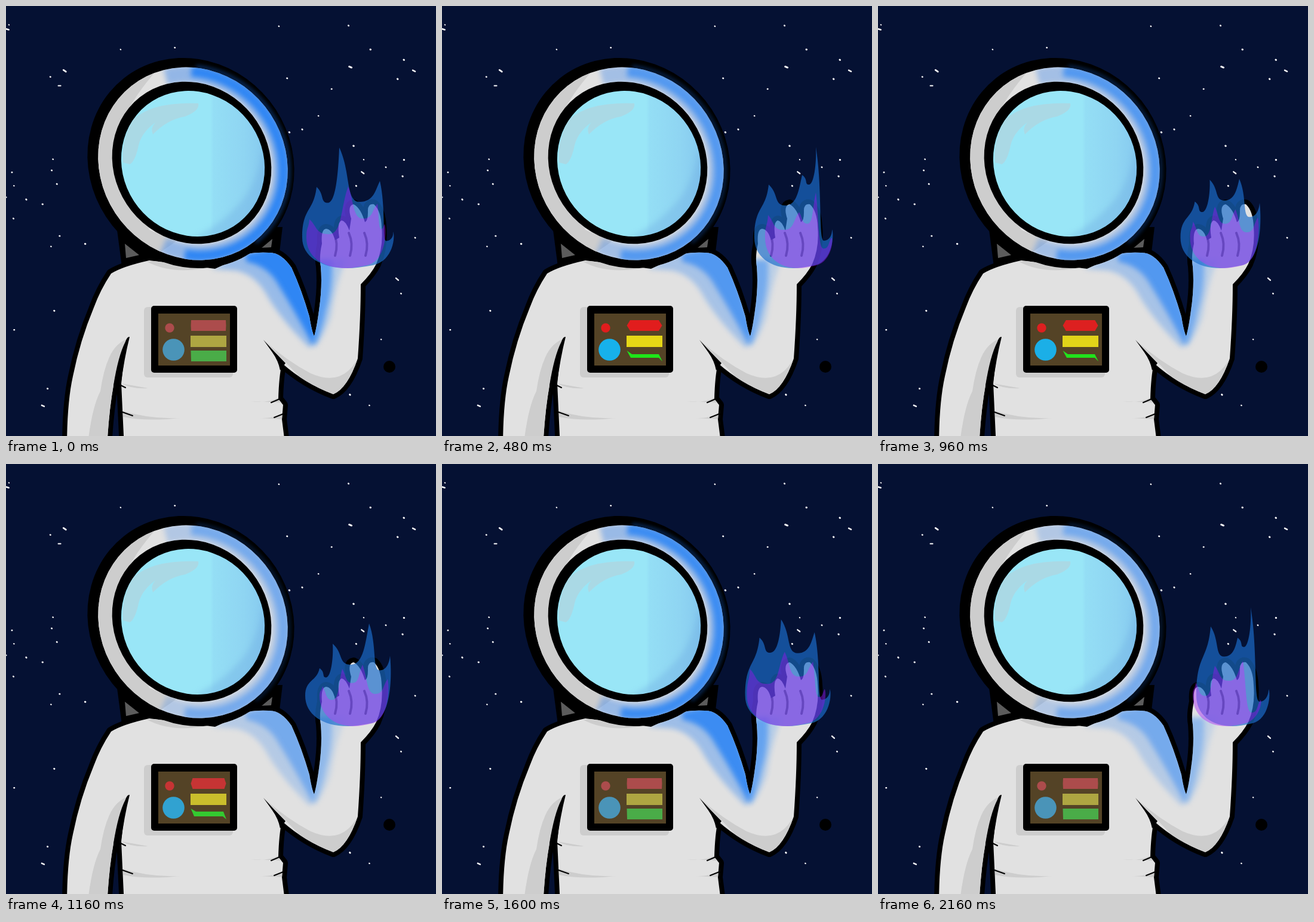
An HTML page with a canvas for the animation above (2200 ms loop, 720 px wide and 720 px high).

```html
<!DOCTYPE html>
<html lang="en">
<head>
<meta charset="utf-8">
<title>Astronaut with a blue flame</title>
<style>
html, body { margin: 0; width: 100%; height: 100%; overflow: hidden; background: #051133; }
canvas { display: block; width: 720px; height: 720px; }
</style>
</head>
<body>
<canvas id="stage" width="720" height="720"></canvas>
<script>
const LOOP = 2200, STEP = 40, TILT = 0.9;
const NIGHT = '#051133', SUIT = '#e1e1e1', SHADE = '#cdcdcd', BLUE = '#2f86f4';
const ctx = document.getElementById('stage').getContext('2d');

const mix = (a, b, k) => Array.isArray(a) ? a.map((v, i) => mix(v, b[i], k)) : a + (b - a) * k;
const rgb = v => `rgb(${v.map(Math.round)})`;

function layer() {
  const c = document.createElement('canvas');
  c.width = c.height = 720;
  return c.getContext('2d');
}

function oval(x, y, a, b, from = 0, to = 2 * Math.PI) {
  const path = new Path2D();
  path.ellipse(x, y, a, b, TILT, from, to);
  return path;
}

function fill(c, color, shape) {
  c.fillStyle = color;
  c.fill(typeof shape === 'string' ? new Path2D(shape) : shape);
}

function line(c, color, width, shape) {
  c.strokeStyle = color;
  c.lineWidth = width;
  c.stroke(typeof shape === 'string' ? new Path2D(shape) : shape);
}

function disc(c, color, x, y, r) {
  c.fillStyle = color;
  c.beginPath();
  c.arc(x, y, r, 0, 7);
  c.fill();
}

function box(c, color, x, y, w, h, r = 0) {
  c.fillStyle = color;
  c.beginPath();
  c.roundRect(x, y, w, h, r);
  c.fill();
}

const helmet = oval(309.5, 263, 181, 168);
const shell = oval(313, 264, 166, 154);
const rim = oval(311, 262.5, 140, 129);
const glass = oval(313, 264, 125, 117);

const body = new Path2D('M240 426Q195 436 176 448Q158 475 147 505Q124 560 112 620Q102 665 102 740' +
  'H169Q172 680 180 635Q188 590 205 557Q197 590 193 632L198 740H468L462 692L464 668L456 658' +
  'Q457 620 462 598Q500 632 548 650Q572 640 589 590Q594 520 594 466Q612 448 620 432' +
  'Q632 405 629 370Q628 343 616 332Q605 330 606 345Q606 360 601 362Q594 338 582 332' +
  'Q571 334 578 356L575 376Q569 360 562 359Q554 362 558 388L551 392Q546 374 536 373' +
  'Q527 374 529 398Q524 420 527 436Q530 470 524 510Q520 540 516 553Q512 545 508 520' +
  'Q495 475 478 438Q460 412 440 413Q420 412 405 415L350 440Z');

function drawStars(c) {
  let seed = 11;
  const rand = () => (seed = seed * 16807 % 2147483647) / 2147483647;
  c.lineCap = 'round';
  for (let i = 0; i < 90; i++) {
    const x = rand() * 720, y = 25 + rand() * 660, dash = rand() < 0.15 ? 4 : 0.5;
    line(c, '#fff', 2 + rand(), `M${x} ${y}l${dash} ${dash * rand()}`);
  }
}

function drawSuit(c) {
  fill(c, '#000', 'M186 375L194 436L260 440L400 430L458 412L463 370Z');
  fill(c, '#5c5c5c', 'M199 398L201 422L223 417ZM446 390L444 404L428 405Z');

  c.lineJoin = 'round';
  line(c, '#000', 16, body);
  fill(c, SUIT, body);
  c.save();
  c.clip(body);
  fill(c, SHADE, 'M207 556Q184 563 173 588Q163 610 158 645Q145 670 138 724H172L182 630Z');
  fill(c, SHADE, 'M432 560Q470 594 510 615Q570 642 596 575V660H530Z');
  fill(c, SHADE, 'M236 428Q280 452 350 436L310 420Z');
  fill(c, SHADE, 'M193 632Q212 642 238 640ZM196 678Q240 692 292 690Q235 696 196 688Z');
  fill(c, SHADE, 'M410 662Q438 666 458 655L462 664ZM425 690Q448 691 466 682V692Z');
  c.restore();
  line(c, '#000', 2, 'M192 635L200 639M195 680L212 686M444 664L458 658M449 689L464 683');
  fill(c, '#000', 'M207 554Q203 553 200 562Q188 585 180 635H192Q198 590 207 554Z');
  fill(c, '#000', 'M431 559Q450 580 468 598L459 610Q456 594 446 580Z');
  fill(c, NIGHT, 'M184 690L181 720H187Z');

  // finger gaps
  for (const x of [549, 574, 600]) line(c, '#000', 4, `M${x} 380q8 18 2 38`);

  // chest panel
  box(c, SHADE, 231, 504, 149, 118, 6);
  box(c, '#000', 243, 502, 144, 112, 5);
  box(c, '#544326', 255, 515, 120, 87);
}

function drawHelmet(c) {
  fill(c, '#000', helmet);
  fill(c, SUIT, shell);
  c.save();
  c.clip(shell);
  fill(c, SHADE, 'M252 108Q217 148 202 180Q190 202 184 240L240 375L285 394L240 425L140 400V110Z');
  c.restore();
  fill(c, '#000', rim);

  const tint = c.createLinearGradient(342, 0, 436, 0);
  tint.addColorStop(0, '#99e6f7');
  tint.addColorStop(0.06, '#94def5');
  tint.addColorStop(0.6, '#8fd5f2');
  tint.addColorStop(1, '#86c9ef');
  fill(c, tint, glass);
  c.save();
  c.clip(glass);
  c.filter = 'blur(5px)';
  fill(c, 'rgba(112,175,228,.4)', 'M310 390Q365 365 400 320Q425 285 428 240L445 290L400 380Z');
  c.filter = 'none';
  fill(c, 'rgba(178,212,222,.7)', 'M196 262Q192 225 213 190Q245 160 322 163Q325 175 300 185' +
    'Q270 190 246 215Q241 205 250 195Q225 213 221 238Q215 262 207 265Z');
  c.restore();
}

function drawScene() {
  const c = layer();
  c.fillStyle = NIGHT;
  c.fillRect(0, 0, 720, 720);
  drawStars(c);
  disc(c, '#000', 642, 604, 10);
  drawSuit(c);
  drawHelmet(c);
  return c.canvas;
}

// Firelight that falls on the suit and the helmet shell.
function drawGlow() {
  const c = layer();
  const ring = new Path2D(shell), around = new Path2D('M0 0H720V720H0Z');
  ring.addPath(rim);
  around.addPath(helmet);

  c.save();
  c.clip(helmet);
  c.filter = 'blur(3px)';
  line(c, 'rgba(15,70,150,.6)', 6, oval(313, 264, 168, 156, -2.4, 0));
  c.restore();

  c.save();
  c.clip(ring, 'evenodd');
  c.filter = 'blur(4px)';
  line(c, 'rgba(70,140,235,.5)', 28, oval(313, 264, 154, 143, -2.75, 1.05));
  line(c, BLUE, 18, oval(313, 264, 159, 147, -2.45, 0.8));
  c.restore();

  c.save();
  c.clip(body);
  c.clip(around, 'evenodd');
  c.filter = 'blur(4px)';
  fill(c, 'rgba(80,150,240,.5)', 'M345 440L405 410H450L485 435L520 560L508 572Q465 530 440 490Q420 450 385 443Z');
  fill(c, BLUE, 'M402 415L450 405L485 430L520 545L514 568Q480 505 458 470Q440 435 402 428Z');
  fill(c, 'rgba(110,170,240,.4)', 'M522 425H568Q550 475 544 520Q530 560 515 573Z');
  fill(c, 'rgba(55,140,245,.7)', 'M520 425H546Q548 470 536 510Q528 550 515 568Z');
  c.restore();
  return c.canvas;
}

// A bowl of fire under a row of tips; the dips between tips follow from their spacing.
function flame(tips, pad, dip, bend) {
  const bottom = 439, side = 388, last = tips[tips.length - 1];
  const left = tips[0][0] - pad, right = last[0] + 1, mid = (left + right) / 2;
  const path = new Path2D();
  path.moveTo(mid, bottom);
  path.bezierCurveTo(mix(mid, left, 0.6), bottom, left, bottom - 20, left, side);
  path.bezierCurveTo(left, mix(side, tips[0][1], 0.6), mix(left, tips[0][0], 0.8), mix(side, tips[0][1], 0.5), ...tips[0]);
  for (let i = 1; i < tips.length; i++) {
    const [ax, ay] = tips[i - 1], [bx, by] = tips[i];
    const x = (ax + bx) / 2, y = Math.max(ay, by) + Math.min(dip, 0.7 * (bx - ax));
    path.bezierCurveTo(mix(ax, x, 0.4) + bend, mix(ay, y, 0.45), mix(ax, x, 0.3), y, x, y);
    path.bezierCurveTo(mix(x, bx, 0.7), y, mix(x, bx, 0.6) + bend, mix(by, y, 0.45), bx, by);
  }
  path.bezierCurveTo(right + 3, mix(last[1], side, 0.6), right, bottom - 12, mix(right, mid, 0.45), bottom - 5);
  path.quadraticCurveTo(mix(right, mid, 0.8), bottom, mid, bottom);
  return path;
}

// Key poses: time, firelight, tips of the outer and the inner flame.
const rest = {
  light: 1,
  outer: [[520, 303], [558, 237], [626, 293], [648, 378]],
  inner: [[508, 357], [573, 302], [622, 331], [634, 365]]
};
const poses = [
  { t: 0, ...rest },
  { t: 480, light: 0.8,
    outer: [[547, 299], [603, 283], [626, 236], [653, 374]],
    inner: [[546, 350], [598, 345], [626, 312], [652, 388]] },
  { t: 760, light: 1,
    outer: [[536, 313], [564, 281], [602, 312], [635, 338]],
    inner: [[525, 350], [565, 329], [600, 345], [633, 348]] },
  { t: 1160, light: 0.6,
    outer: [[525, 342], [547, 301], [608, 267], [643, 321]],
    inner: [[530, 372], [563, 343], [597, 336], [639, 360]] },
  { t: 1400, light: 0.8,
    outer: [[551, 270], [584, 299], [620, 263], [651, 375]],
    inner: [[528, 320], [575, 335], [620, 331], [652, 396]] },
  { t: 1720, ...rest },
  { t: 2160, light: 0.6,
    outer: [[557, 272], [602, 291], [624, 240], [654, 377]],
    inner: [[532, 366], [564, 338], [611, 330], [640, 396]] }
];

function poseAt(t) {
  const i = Math.max(1, poses.findIndex(p => p.t >= t));
  const a = poses[i - 1], b = poses[i], k = (t - a.t) / (b.t - a.t), out = {};
  for (const name in a) out[name] = mix(a[name], b[name], k);
  return out;
}

function drawLamps(t) {
  const on = t < 1400 ? Math.sin(Math.PI * t / 1400) ** 1.3 : 0;
  const tone = (off, lit) => rgb(mix(off, lit, on));
  const red = tone([172, 76, 76], [234, 20, 20]);
  disc(ctx, red, 274, 539, 7.7);
  disc(ctx, tone([74, 148, 184], [14, 182, 244]), 280.5, 575.5, 18.3);
  box(ctx, tone([174, 166, 66], [240, 224, 14]), 309, 552, 60, 19);

  // the red bar's corners draw in, the green bar thins to a slanted ribbon
  const cut = 6 * on, thin = 6 * Math.min(1, 2 * on);
  fill(ctx, red, `M309.5 535L${310 + cut} 526H${368 - cut}L368.5 535L${368 - cut} 544H${310 + cut}Z`);
  fill(ctx, tone([74, 172, 72], [22, 240, 16]),
    `M309.5 577L318 ${577 + thin}H${369 - thin}L369 595L363 ${595 - thin}H${310 + thin}Z`);
}

const scene = drawScene(), glow = drawGlow();

function draw(t) {
  const p = poseAt(t);
  const outer = flame(p.outer, 24, 35, 6), inner = flame(p.inner, 5, 25, 0);
  ctx.drawImage(scene, 0, 0);
  ctx.globalAlpha = p.light;
  ctx.drawImage(glow, 0, 0);
  ctx.globalAlpha = 1;
  drawLamps(t);
  fill(ctx, 'rgba(27,110,204,.68)', outer);
  fill(ctx, 'rgba(150,20,235,.45)', inner);

  // the hand shines through the inner flame
  ctx.save();
  ctx.clip(inner);
  fill(ctx, 'rgba(255,200,255,.14)', body);
  ctx.restore();
}

const start = performance.now();
function tick() {
  const t = (performance.now() - start) % LOOP;
  draw(Math.floor(t / STEP) * STEP);
  requestAnimationFrame(tick);
}
tick();
</script>
</body>
</html>
```
